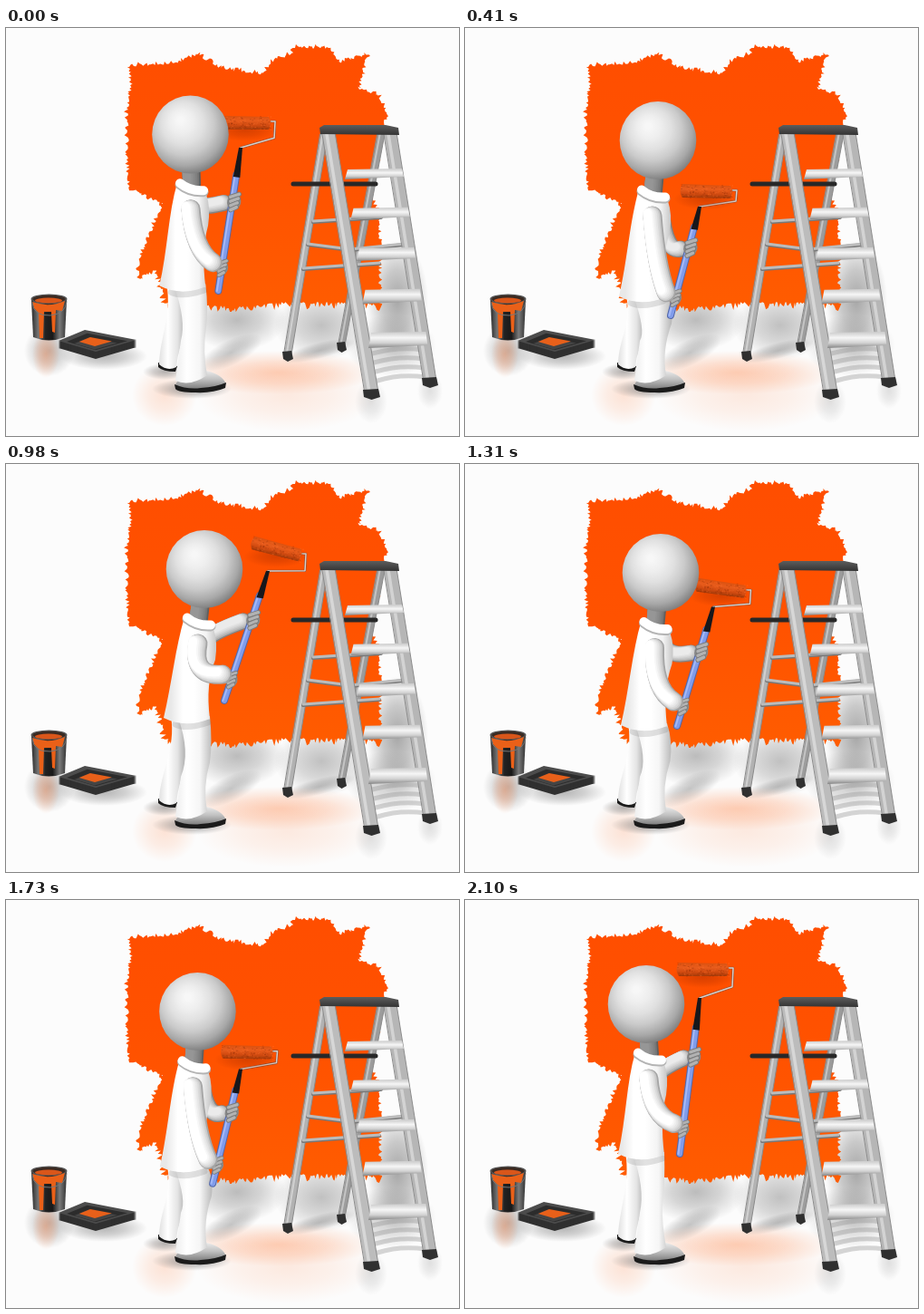
Animation, 500 px wide and 450 px high, one loop 2.28 s. Source, as an HTML page with a canvas:

```html
<!DOCTYPE html>
<html lang="en">
<head>
<meta charset="utf-8">
<title>Painter</title>
<style>
  html, body { margin: 0; width: 100%; height: 100%; overflow: hidden; background: #fcfcfc; }
  canvas { display: block; width: 500px; height: 450px; }
</style>
</head>
<body>
<canvas id="stage" width="500" height="450"></canvas>
<script>
const W = 500, H = 450;
const stage = document.getElementById('stage').getContext('2d');
let g = stage;

// How long each step of the swing is held, in ms
const holds = [130, 130, 150, 180, 150, 120, 120, 180, 150, 120, 120, 180, 120, 130, 120, 180];
const LOOP = holds.reduce((a, b) => a + b);

// Crouching pose, then the shift to the upper left and upper right reach
const joints = {
  head:   [213, 124, -13, -9, 6, -8],
  collar: [209, 183, -4, -10, 5, -9],
  hem:    [196, 298, -1, -16, 4, -16],
  knee:   [228, 326, -10, 9, -3, 3],
  elbow:  [211, 262, -5, -24, -6, -27],
  rollA:  [238, 180, -4, -103, 33, -93],
  rollB:  [295, 181, -4, -104, 31, -80],
  fork:   [259, 197, 0, -89, 30, -79],
  grip:   [227, 317, 10, -37, 14, -56]
};

// The arm swings left, low, right and back in 16 steps
function poseAt(step) {
  const turn = 4 - Math.abs(8 - step % 16), x = Math.abs(turn) / 4, left = turn < 0;
  const soft = left ? 2.2 : 3, reach = x * x * (soft - (soft - 1) * x);
  const pose = {};
  for (const name in joints) {
    const [px, py, lx, ly, rx, ry] = joints[name];
    pose[name] = { x: px + reach * (left ? lx : rx), y: py + reach * (left ? ly : ry) };
  }
  return pose;
}

function random(seed) {
  return () => (seed = (seed * 16807) % 2147483647) / 2147483647;
}
const gray = v => `rgb(${v},${v},${v})`;
const lerp = (a, b, t) => ({ x: a.x + (b.x - a.x) * t, y: a.y + (b.y - a.y) * t });

function ramp(x0, y0, x1, y1, ...colors) {
  const r = g.createLinearGradient(x0, y0, x1, y1);
  colors.forEach((c, i) => r.addColorStop(i / (colors.length - 1), c));
  return r;
}
function shape(fill, d) {
  g.fillStyle = fill;
  g.fill(new Path2D(d));
}
function line(color, width, d) {
  g.strokeStyle = color;
  g.lineWidth = width;
  g.stroke(new Path2D(d));
}
function oval(fill, x, y, rx, ry, turn = 0) {
  g.fillStyle = fill;
  g.beginPath();
  g.ellipse(x, y, rx, ry, turn, 0, 7);
  g.fill();
}
// Flat diamond seen in perspective
function tile(fill, x, y, s) {
  shape(fill, `M${x - 41 * s} ${y}L${x - 12 * s} ${y - 12 * s}L${x + 45 * s} ${y - s}L${x} ${y + 12 * s}Z`);
}
// Soft blob; rgb is "r,g,b"
function soft(rgb, alpha, x, y, rx, ry, turn = 0) {
  g.save();
  g.translate(x, y);
  g.rotate(turn);
  g.scale(rx, ry);
  const r = g.createRadialGradient(0, 0, 0, 0, 0, 1);
  r.addColorStop(0, `rgba(${rgb},${alpha})`);
  r.addColorStop(.5, `rgba(${rgb},${alpha * .6})`);
  r.addColorStop(1, `rgba(${rgb},0)`);
  g.fillStyle = r;
  g.fillRect(-1, -1, 2, 2);
  g.restore();
}
// Rounded limb whose shade gathers on the lower right
function tube(a, c, b, width, dark, light) {
  const d = `M${a.x} ${a.y}Q${c.x} ${c.y} ${b.x} ${b.y}`;
  for (let i = 0; i < 7; i++) {
    const inset = width * .045 * i;
    g.save();
    g.translate(-inset, -inset * .5);
    line(gray(Math.round(dark + (light - dark) * Math.sqrt(i / 6))), width - inset * 2, d);
    g.restore();
  }
}

function floor() {
  const shade = '110,110,110', glow = '255,125,60';
  soft(shade, .45, 255, 322, 54, 34);
  soft(shade, .4, 248, 358, 38, 14, -.45);
  soft(shade, .42, 348, 328, 52, 38);
  soft(shade, .4, 345, 356, 42, 9, -.25);
  soft(shade, .6, 432, 300, 34, 66);
  soft(shade, .35, 425, 350, 50, 34);
  soft(glow, .34, 300, 380, 110, 24);
  soft(glow, .15, 310, 405, 100, 40);
  soft(glow, .2, 175, 405, 36, 34);
  soft(shade, .6, 205, 398, 44, 11);
  soft(shade, .5, 175, 379, 24, 9);
  soft(shade, .5, 108, 362, 48, 15);
  soft(shade, .45, 48, 356, 28, 28);
  soft(glow, .35, 44, 360, 15, 26);
  soft(shade, .2, 403, 412, 18, 24);
  soft(shade, .2, 468, 400, 14, 20);
}

// Paint patch: straight runs between a few corners, roughened like bristles
function splash() {
  const corners = [
    [136, 42], [186, 39], [211, 29], [238, 45], [284, 51], [292, 38], [316, 28], [319, 21], [358, 22],
    [368, 38], [399, 29], [388, 66], [411, 74], [420, 93], [402, 186], [412, 206], [412, 305],
    [352, 304], [306, 304], [255, 309], [178, 305], [166, 267], [146, 275], [147, 255],
    [173, 194], [136, 176], [134, 90], [139, 62]
  ];
  const rnd = random(71);
  g.beginPath();
  corners.forEach(([x, y], i) => {
    const [nx, ny] = corners[(i + 1) % corners.length], dx = nx - x, dy = ny - y;
    const len = Math.hypot(dx, dy), reach = y > 300 ? 9 : 5;
    for (let s = 0; s < len; s += .8 + rnd() * 1.8) {
      const out = reach * (rnd() ** 2 - .2), t = s / len;
      g.lineTo(x + dx * t + dy / len * out, y + dy * t - dx / len * out);
    }
  });
  g.closePath();
  g.fillStyle = ramp(0, 30, 0, 310, '#ff4e00', '#ff5200', '#ff5c00');
  g.fill();
}

function paintPot() {
  shape(ramp(28, 0, 67, 0, '#2a2a2a', '#777', '#222', '#191919', '#7a7a7a', '#333'),
    'M28 300L30 341Q47 348 65 341L67 300Z');
  oval('#555', 47.5, 299, 20, 5.5);
  oval('#3a2a22', 47.5, 299, 18, 4.2);
  oval('#d9561a', 47, 300.5, 15, 3);
  shape('#ea6018', 'M29 302Q47 309 65 301L62 312L55 311L54 336L51 335L50 313L42 313L41 342L37 342L36 314L31 309Z');
  line('#777', 1, 'M29 303Q30 318 49 317Q66 315 67 302');
}

function tray() {
  for (let lift = 8; lift >= 0; lift--) tile(lift ? '#303030' : '#4c4c4c', 99, 345 + lift, 1);
  tile('#2c2c2c', 99, 346, .78);
  tile('#454545', 98, 348, .55);
  tile('#e8601a', 98, 346, .42);
}

// Tapering bar from (x0,y0) to (x1,y1), lit along its middle
function rail(x0, y0, x1, y1, w0, w1, edge, face) {
  const d = `M${x0} ${y0}L${x0 + w0} ${y0}L${x1 + w1} ${y1}L${x1} ${y1 - 1}Z`;
  shape(face, d);
  line(edge, 1, d);
  line('rgba(255,255,255,.4)', w0 / 4, `M${x0 + w0 / 3} ${y0}L${x1 + w1 / 3} ${y1}`);
  shape('#303030', `M${x1 - 2} ${y1 - 3}L${x1 + w1} ${y1 - 4}L${x1 + w1 + 2} ${y1 + 5}L${x1 + w1 / 2} ${y1 + 8}L${x1 - 1} ${y1 + 5}Z`);
}
function brace(x0, y0, x1, y1) {
  line('#777', 4, `M${x0} ${y0 + 1}L${x1} ${y1 + 1}`);
  line('#bcbcbc', 3, `M${x0} ${y0}L${x1} ${y1}`);
}

function ladder() {
  for (let i = 0; i < 4; i++) {
    line('rgba(150,150,150,.4)', 5, `M${404 + i * 2} ${359 + i * 10}Q435 ${351 + i * 10} ${460 + i} ${355 + i * 10}`);
  }
  rail(410, 117, 367, 350, 8, 7, '#8a8a8a', '#9c9c9c');
  rail(347, 117, 307, 360, 8, 8, '#8a8a8a', '#b2b2b2');
  brace(339, 213, 414, 208);
  brace(333, 238, 380, 244);
  brace(380, 244, 440, 238);
  brace(328, 265, 412, 259);
  line('#282828', 5, 'M317 172L408 172');
  rail(349, 115, 396, 402, 14, 15, '#8c8c8c', '#bcbcbc');
  rail(417, 115, 461, 389, 14, 14, '#8c8c8c', '#b6b6b6');
  for (let i = 0; i < 5; i++) {
    const y = 156 + i * (42 + i * .75), h = 11 + i * 1.5, l = 374 + i * 6.5, r = 437 + i * 6.6;
    shape(ramp(0, y, 0, y + h, '#d0d0d0', '#f6f6f6', '#d2d2d2', '#858585'),
      `M${l + 3} ${y}L${r} ${y - 1}L${r + 2} ${y + h - 3}L${l} ${y + h}Z`);
  }
  shape(ramp(0, 107, 0, 118, '#5d5d5d', '#484848', '#333'), 'M351 107L419 107L433 110L434 118L347 117L346 110Z');
}

function shoes() {
  shape('#1b1b1b', 'M168 369L189 373L187 379Q173 379 168 374Z');
  shape(ramp(0, 376, 0, 399, '#f4f4f4', '#c0c0c0', '#777'), 'M187 396Q187 385 205 385L221 378Q239 382 243 393L215 400Z');
  shape('#1b1b1b', 'M186 393Q200 399 215 397Q232 396 243 391L242 397Q228 403 209 402Q190 402 187 398Z');
}

function roller(a, b) {
  const len = Math.hypot(b.x - a.x, b.y - a.y), rnd = random(9);
  soft('170,45,0', .45, (a.x + b.x) / 2, (a.y + b.y) / 2 + 8, 36, 12);
  g.save();
  g.translate(a.x, a.y);
  g.rotate(Math.atan2(b.y - a.y, b.x - a.x));
  shape(ramp(0, -8, 0, 8, '#d9500f', '#e85c1c', '#d04a10', '#983608'),
    `M2 -8L${len - 2} -7Q${len + 2} 0 ${len - 2} 7L2 7Q-3 0 2 -8Z`);
  for (let i = 0; i < 150; i++) {
    g.fillStyle = i % 2 ? 'rgba(130,40,5,.3)' : 'rgba(255,115,50,.3)';
    g.fillRect(rnd() * len, rnd() * 15 - 8, 1.5, 1);
  }
  g.restore();
}

function hand(p, size) {
  oval('#8a8a8a', p.x, p.y, 8 * size, 9 * size, .3);
  for (let i = 0; i < 4; i++) {
    const y = p.y + (i * 5 - 8) * size;
    const d = `M${p.x - 4 * size} ${y + 2}L${p.x + 6 * size - i} ${y - 1}`;
    line('#7c7c7c', 5.6 * size, d);
    line('#b2b2b2', 3.6 * size, d);
  }
}

function person({ head, collar: c, hem: h, knee: k, elbow, rollA, rollB, fork, grip }) {
  const farHand = lerp(fork, grip, .38), nearHand = lerp(fork, grip, .84), neck = lerp(fork, grip, .19);
  farHand.x += 2;

  // Wire frame and roller
  const side = rollB.x + 5, drop = 10 + (180 - rollB.y) * .085;
  const wire = `M${rollB.x} ${rollB.y - 2}L${side} ${rollB.y - 2}L${side - 1} ${rollB.y + drop}L${fork.x} ${fork.y}`;
  line('#8b4a2c', 2.6, wire);
  line('#d8d0cc', 1.5, wire);
  roller(rollA, rollB);

  // Legs
  shape(ramp(168, 0, 200, 0, '#dedede', '#fff', '#e4e4e4', '#a4a4a4'),
    `M${h.x - 18} ${h.y - 4}C${h.x - 12} ${h.y + 32} 170 340 169 371Q178 379 188 374Q190 352 202 ${h.y + 42}L${h.x + 12} ${h.y}Z`);
  shape(ramp(186, 0, 228, 0, '#ededed', '#fff', '#f6f6f6', '#b8b8b8'),
    `M${h.x - 10} ${h.y - 2}Q${h.x + 4} ${h.y + 36} 193 345L187 389Q203 396 222 383Q217 356 ${k.x} ${k.y}` +
    `Q${k.x + 3} ${k.y - 22} ${h.x + 25} ${h.y - 4}Z`);
  line('rgba(110,110,110,.2)', 7, `M${h.x - 13} ${h.y + 5}Q${h.x} ${h.y + 11} ${h.x + 23} ${h.y + 3}`);

  // Far arm and jacket
  tube({ x: c.x + 8, y: c.y + 20 }, { x: c.x + 13, y: Math.max(farHand.y + 6, c.y + 12) },
    { x: farHand.x - 11, y: farHand.y + 1 }, 18, 130, 235);
  shape(ramp(c.x - 32, 0, c.x + 20, 0, '#e8e8e8', '#fff', '#fff', '#f4f4f4', '#bebebe'),
    `M${c.x - 17} ${c.y - 5}C${c.x - 27} ${c.y + 28} ${h.x - 17} ${h.y - 40} ${h.x - 26} ${h.y - 2}` +
    `Q${h.x - 2} ${h.y + 10} ${h.x + 25} ${h.y - 1}Q${h.x + 20} ${h.y - 40} ${c.x + 17} ${c.y + 42}` +
    `Q${c.x + 20} ${c.y + 22} ${c.x + 15} ${c.y + 8}Z`);

  // Handle
  line('#5267a8', 8, `M${neck.x} ${neck.y}L${grip.x} ${grip.y}`);
  line('#809ceb', 6, `M${neck.x} ${neck.y}L${grip.x} ${grip.y}`);
  line('#a3b8f6', 2, `M${neck.x - 1.5} ${neck.y}L${grip.x - 1.5} ${grip.y}`);
  shape('#17171b', `M${fork.x - 2} ${fork.y}L${fork.x + 2} ${fork.y}L${neck.x + 4} ${neck.y + 3}L${neck.x - 3.5} ${neck.y + 2}Z`);
  hand(farHand, .95);
  hand(nearHand, .85);

  // Near arm
  const cuff = { x: nearHand.x - 10, y: nearHand.y - 6 }, shoulder = { x: c.x - 2, y: c.y + 24 };
  tube(shoulder, elbow, cuff, 21, 165, 255);

  // Neck, collar, head
  const throat = { x: c.x - 1, y: c.y - 3 };
  tube(head, throat, throat, 20, 95, 150);
  for (const [color, width, dy] of [['#b4b4b4', 11, 1], ['#fff', 10, -.5]]) {
    line(color, width, `M${c.x - 14} ${c.y - 4 + dy}Q${c.x - 3} ${c.y + 5 + dy} ${c.x + 12} ${c.y + 4 + dy}`);
  }
  const r = g.createRadialGradient(head.x - 11, head.y - 16, 3, head.x - 5, head.y - 8, 54);
  [247, 238, 224, 202, 168, 118].forEach((v, i) => r.addColorStop(i / 5, gray(v)));
  oval(r, head.x, head.y, 42.3, 43);
}

function init(ctx) {
  g = ctx;
  g.lineCap = g.lineJoin = 'round';
}

const scene = document.createElement('canvas');
scene.width = W;
scene.height = H;
init(scene.getContext('2d'));
g.fillStyle = '#fcfcfc';
g.fillRect(0, 0, W, H);
floor();
splash();
paintPot();
tray();
ladder();
shoes();
init(stage);

let shown = -1;
const start = performance.now();
function frame() {
  let t = (performance.now() - start) % LOOP, i = 0;
  while (t >= holds[i]) t -= holds[i++];
  if (i !== shown) {
    shown = i;
    g.drawImage(scene, 0, 0);
    person(poseAt(i + 1));
  }
  requestAnimationFrame(frame);
}
frame();
</script>
</body>
</html>
```
